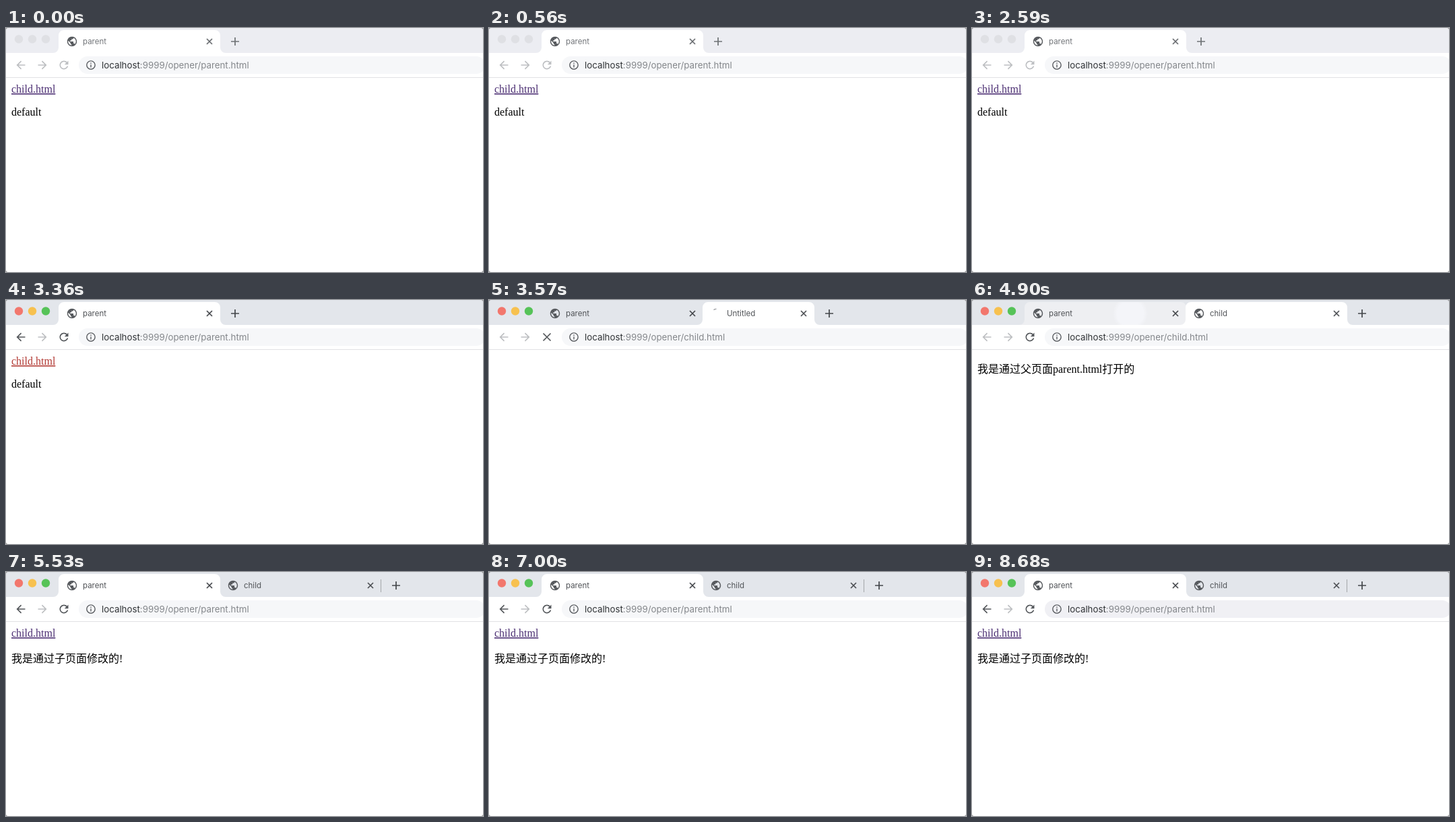
An HTML page for the animation above (8890 ms loop, 708x362 px).

```html
<!DOCTYPE html>
<html lang="zh">
<head>
<meta charset="utf-8">
<title>opener</title>
<style>
html, body { margin: 0; width: 100%; height: 100%; overflow: hidden; background: #fff; }
svg { display: block; width: 708px; height: 362px; }
.ui { font-family: Inter, Roboto, sans-serif; font-size: 11.5px; }
.url { font-family: Inter, Roboto, sans-serif; font-size: 13.3px; }
.page { font-family: "Liberation Serif", "Noto Sans CJK SC", "Noto Sans CJK", serif; font-size: 16px; }
.line { fill: none; stroke-width: 1.7; }
</style>
</head>
<body>
<svg viewBox="0 0 708 362">
  <defs>
    <path id="globe" transform="scale(.72) translate(-12 -12)" d="M12 2C6.48 2 2 6.48 2 12s4.48 10 10 10 10-4.48 10-10S17.52 2 12 2zm-1 17.93c-3.95-.49-7-3.85-7-7.93 0-.62.08-1.21.21-1.79L9 15v1c0 1.1.9 2 2 2v1.93zm6.9-2.54c-.26-.81-1-1.39-1.9-1.39h-1v-3c0-.55-.45-1-1-1H8v-2h2c.55 0 1-.45 1-1V7h2c1.1 0 2-.9 2-2v-.41c2.93 1.19 5 4.06 5 7.41 0 2.08-.8 3.97-2.1 5.39z"/>
    <path id="arrow" transform="scale(.81) translate(-12 -12)" d="M20 11H7.83l5.59-5.59L12 4l-8 8 8 8 1.41-1.41L7.83 13H20z"/>
    <path id="cross" class="line" d="M-4-4 4 4M4-4-4 4"/>
    <radialGradient id="glow">
      <stop offset=".75" stop-color="#f4f5f9"/>
      <stop offset="1" stop-color="#f4f5f9" stop-opacity="0"/>
    </radialGradient>
    <clipPath id="parentClip"><path id="parentShape"/></clipPath>
  </defs>

  <rect width="708" height="362" fill="#fff"/>
  <rect id="strip" width="708" height="37"/>
  <g id="lights">
    <circle cx="19" cy="16.5" r="6.2"/>
    <circle cx="39" cy="16.5" r="6.2"/>
    <circle cx="59" cy="16.5" r="6.2"/>
  </g>

  <g id="hover" clip-path="url(#parentClip)">
    <rect x="70" width="256" height="37" fill="#eeeff2"/>
    <circle cx="235" cy="20" r="26" fill="url(#glow)"/>
  </g>
  <path id="activeTab" fill="#fff"/>
  <path id="divider" d="M556.5 11v19" stroke="#a3a6aa"/>

  <g class="ui">
    <use href="#globe" x="0" y="0" transform="translate(98 20)" fill="#585b5f"/>
    <text id="parentTitle" x="114" y="24">parent</text>
    <use id="parentClose" href="#cross" transform="translate(302 20)"/>
    <g id="childTab">
      <use id="childIcon" href="#globe" transform="translate(337 20)" fill="#585b5f"/>
      <path id="spinner" d="M333.5 14.6a6.5 6.5 0 0 1 4-1.2" fill="none" stroke="#9a9da1" stroke-width="1.3"/>
      <text id="childTitle" x="353" y="24" fill="#505357"></text>
      <use id="childClose" href="#cross" stroke="#4c4f53"/>
    </g>
  </g>
  <path id="plus" class="line" stroke-width="1.9" d="M-6 0H6M0-6V6"/>

  <rect y="37" width="708" height="36" fill="#fff"/>
  <rect y="73" width="708" height="1" fill="#e1e2e4"/>
  <use id="back" href="#arrow" transform="translate(22 55)"/>
  <use href="#arrow" transform="translate(54 55) scale(-1 1)" fill="#bdbfc2"/>
  <path id="reload" transform="translate(86 55) scale(.81) translate(-12 -12)" d="M17.65 6.35C16.2 4.9 14.21 4 12 4c-4.42 0-7.99 3.58-7.99 8s3.57 8 7.99 8c3.73 0 6.84-2.55 7.73-6h-2.08c-.82 2.33-3.04 4-5.65 4-3.31 0-6-2.69-6-6s2.69-6 6-6c1.66 0 3.14.69 4.22 1.78L13 11h7V4z"/>
  <path id="stop" class="line" transform="translate(86 55)" stroke="#54575b" d="M-5.5-5.5 5.5 5.5M5.5-5.5-5.5 5.5"/>
  <rect id="bar" x="108" y="42" width="603" height="26" rx="13"/>
  <path transform="translate(126 55) scale(.68) translate(-12 -12)" fill="#56595d" d="M11 7h2v2h-2zm0 4h2v6h-2zm1-9C6.48 2 2 6.48 2 12s4.48 10 10 10 10-4.48 10-10S17.52 2 12 2zm0 18c-4.41 0-8-3.59-8-8s3.59-8 8-8 8 3.59 8 8-3.59 8-8 8z"/>
  <text class="url" x="142" y="60" fill="#84878b"><tspan fill="#2f3235">localhost</tspan><tspan id="path"></tspan></text>

  <g class="page">
    <text id="link" x="8" y="96" text-decoration="underline">child.html</text>
    <text id="body" x="8"></text>
  </g>
  <path fill="#8b8b8b" fill-rule="evenodd" d="M0 0H708V362H0zM3 0H705Q708 0 708 3V359Q708 362 705 362H3Q0 362 0 359V3Q0 0 3 0z"/>
</svg>
<script>
const LOOP = 8890, STEP = 70;
const FOCUS = 2660, PRESS = 3360, OPEN = 3570, LOADED = 3640, HOVER = 4480, RETURN = 5530, BAR_HOVER = 8680;
const el = {};
document.querySelectorAll('[id]').forEach(node => el[node.id] = node);
const lights = [...el.lights.children];

const set = (node, attrs) => {
  for (const key in attrs) node.setAttribute(key, attrs[key]);
};
const show = (node, on) => node.setAttribute('visibility', on ? 'visible' : 'hidden');
const write = (node, text) => { if (node.textContent !== text) node.textContent = text; };
const clamp = v => Math.max(0, Math.min(1, v));
const at = x => `translate(${x} 20)`;

function tabShape(left, right) {
  return `M${left - 8} 37a8 8 0 0 0 8-8V11a8 8 0 0 1 8-8H${right - 8}` +
    `a8 8 0 0 1 8 8V29a8 8 0 0 0 8 8z`;
}
el.parentShape.setAttribute('d', tabShape(78, 318));

function draw(time) {
  const t = Math.floor(time / STEP) * STEP;
  const focused = t >= FOCUS;
  const opened = t >= OPEN;
  const onChild = opened && t < RETURN;
  const loading = opened && t < LOADED;
  const changed = t >= RETURN;

  // The new tab eases out to its full width.
  const grow = 1 - (1 - clamp((t - OPEN) / 210)) ** 2;
  const right = opened ? 483 + 74 * grow : 318;
  const dark = focused ? '#44474b' : '#6e7175';

  set(el.strip, { fill: focused ? '#e3e6eb' : '#ecedf2' });
  const colors = focused ? ['#f2776d', '#f7c14f', '#56c358'] : Array(3).fill('#dfe0e4');
  lights.forEach((dot, i) => set(dot, { fill: colors[i] }));

  set(el.activeTab, { d: onChild ? tabShape(317, right) : tabShape(78, 318) });
  set(el.hover, { opacity: onChild ? clamp((t - HOVER + STEP) / 140) : 0 });
  show(el.divider, changed);
  set(el.parentTitle, { fill: focused ? '#505357' : '#73767a' });
  set(el.parentClose, { stroke: focused ? '#44474b' : '#686b6f' });
  set(el.plus, { stroke: dark, transform: at(right + 22) });

  set(el.childTab, { display: opened ? 'inline' : 'none' });
  show(el.childIcon, !loading);
  show(el.spinner, loading);
  write(el.childTitle, loading ? 'Untitled' : 'child');
  set(el.childClose, { transform: at(right - 16) });

  set(el.back, { fill: focused && !onChild ? '#54575b' : '#bdbfc2' });
  set(el.reload, { fill: focused ? '#54575b' : '#bdbfc2' });
  show(el.reload, !loading);
  show(el.stop, loading);
  set(el.bar, { fill: t >= BAR_HOVER ? '#f0f0f4' : '#f6f7f9' });
  write(el.path, `:9999/opener/${onChild ? 'child' : 'parent'}.html`);

  show(el.link, !onChild);
  set(el.link, { fill: t >= PRESS && t < OPEN ? '#b23a34' : '#4c2f73' });
  show(el.body, !loading);
  set(el.body, { y: onChild ? 108 : changed ? 134 : 130 });
  write(el.body, onChild ? '我是通过父页面parent.html打开的' : changed ? '我是通过子页面修改的!' : 'default');
}

const start = performance.now();
function frame() {
  draw((performance.now() - start) % LOOP);
  requestAnimationFrame(frame);
}
frame();
</script>
</body>
</html>
```
